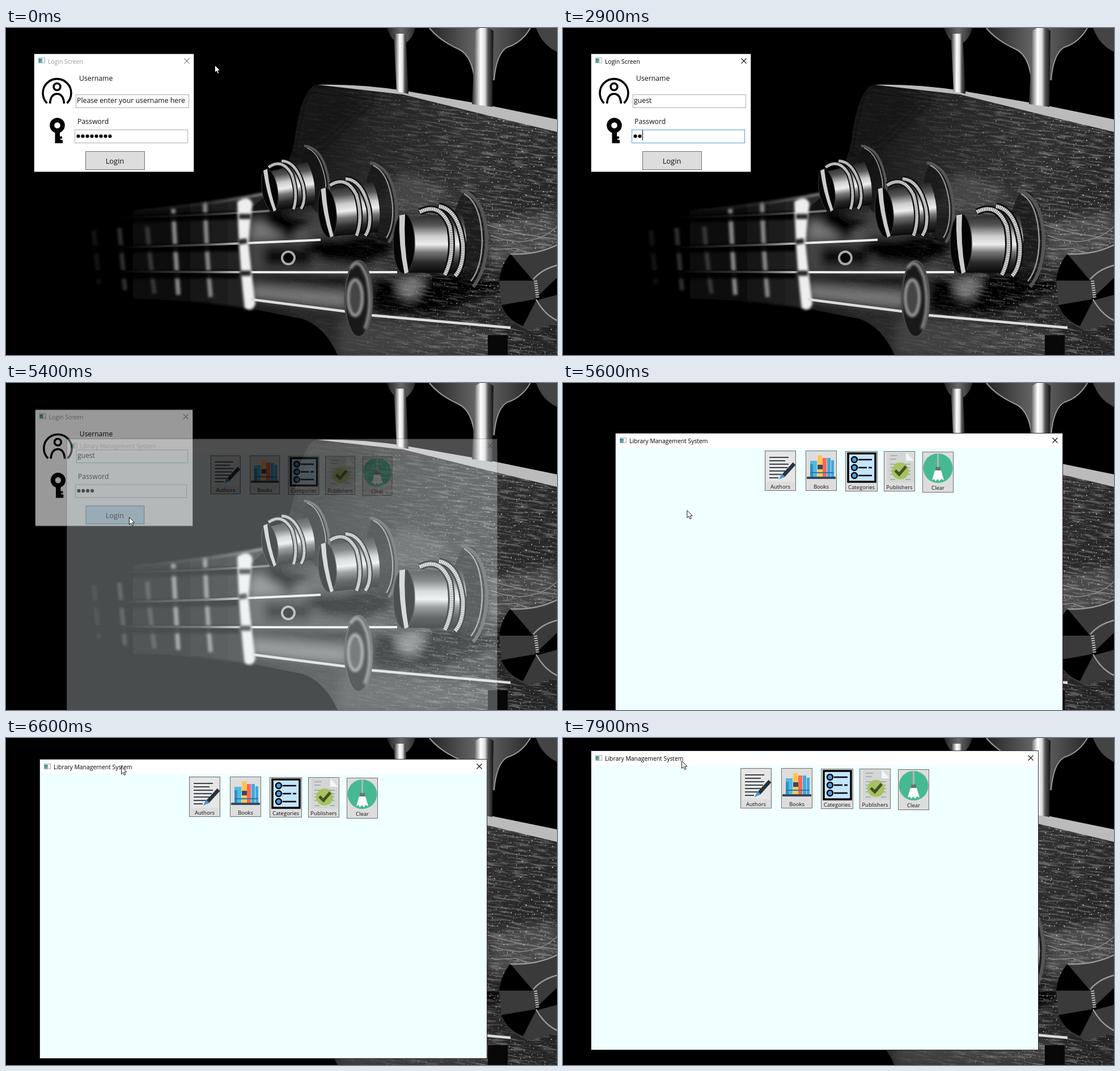
Animation of 972x576 px, one loop 8000 ms. Source, as an HTML page:

```html
<!DOCTYPE html>
<html lang="en">
<head>
<meta charset="utf-8">
<title>Library login</title>
<style>
  html, body { margin: 0; width: 100%; height: 100%; overflow: hidden; background: #000; }
  svg { position: absolute; left: 0; top: 0; }
  #photo { will-change: transform; }
  text { font-family: "Open Sans", "Noto Sans", sans-serif; font-size: 12.3px; fill: #111; white-space: pre; }
  .title { font-size: 10.4px; fill: #000; }
  .idle .title { fill: #999; }
  .idle .close { stroke: #888; }
  .close { stroke: #111; stroke-width: 1.1; }
  .field { fill: #fff; stroke: #abadb3; }
  .field.hover { stroke: #7eb4ea; }
  .field.focus { stroke: #569de5; }
  .button { fill: #ddd; stroke: #707070; }
  .button.hover { fill: #c0e5f8; stroke: #3c7fb1; }
  .small { font-size: 9.5px; text-anchor: middle; }
</style>
</head>
<body>
<svg id="photo" width="972" height="576" viewBox="0 0 972 576">
  <defs>
    <linearGradient id="wood" gradientUnits="userSpaceOnUse" x1="510" y1="180" x2="940" y2="380">
      <stop offset="0" stop-color="#121212"/><stop offset=".3" stop-color="#262626"/>
      <stop offset=".65" stop-color="#303030"/><stop offset="1" stop-color="#242424"/>
    </linearGradient>
    <linearGradient id="neck" x1="0" x2="1">
      <stop offset="0"/><stop offset=".5" stop-color="#0b0b0b"/><stop offset="1" stop-color="#303030"/>
    </linearGradient>
    <linearGradient id="fade" gradientUnits="userSpaceOnUse" x1="200" y1="0" x2="440" y2="0">
      <stop offset="0" stop-color="#000"/><stop offset=".6" stop-color="#444"/><stop offset="1" stop-color="#eee"/>
    </linearGradient>
    <linearGradient id="post" x1="0" x2="1">
      <stop offset="0" stop-color="#222"/><stop offset=".15" stop-color="#777"/><stop offset=".4" stop-color="#fff"/>
      <stop offset=".6" stop-color="#ddd"/><stop offset=".75" stop-color="#555"/><stop offset="1" stop-color="#111"/>
    </linearGradient>
    <linearGradient id="metal" x1="0" y1="0" x2="0" y2="1">
      <stop offset="0" stop-color="#222"/><stop offset=".2" stop-color="#555"/><stop offset=".38" stop-color="#ccc"/>
      <stop offset=".52" stop-color="#eee"/><stop offset=".65" stop-color="#777"/>
      <stop offset=".82" stop-color="#2a2a2a"/><stop offset="1" stop-color="#080808"/>
    </linearGradient>
    <linearGradient id="plate" x1="0" x2="1">
      <stop offset="0" stop-color="#222"/><stop offset=".5" stop-color="#6a6a6a"/><stop offset="1" stop-color="#2a2a2a"/>
    </linearGradient>
    <linearGradient id="rightward" x1="0" x2="1">
      <stop offset=".2" stop-color="#222"/><stop offset=".75" stop-color="#fff"/>
    </linearGradient>
    <filter id="soft" x="-30%" y="-30%" width="160%" height="160%"><feGaussianBlur stdDeviation="8"/></filter>
    <filter id="blur" x="-30%" y="-30%" width="160%" height="160%"><feGaussianBlur stdDeviation="2"/></filter>
    <filter id="grain" x="0" y="0" width="100%" height="100%">
      <feTurbulence type="fractalNoise" baseFrequency=".035 .3" numOctaves="3" seed="7"/>
      <feColorMatrix values="0 0 0 0 .7  0 0 0 0 .7  0 0 0 0 .7  4 0 0 0 -1.900"/>
    </filter>
    <filter id="dust" x="0" y="0" width="100%" height="100%">
      <feTurbulence type="fractalNoise" baseFrequency=".3" numOctaves="2" seed="3"/>
      <feColorMatrix values="0 0 0 0 .8  0 0 0 0 .8  0 0 0 0 .8  9 0 0 0 -6.200"/>
    </filter>
    <mask id="worn"><rect x="500" y="0" width="472" height="576" fill="url(#rightward)"/></mask>
    <path id="head" d="M545 100Q620 98 700 113L850 140L972 180V576H585Q562 525 522 512L440 496L416 332L470 285Q505 235 510 190Q520 115 545 100Z"/>
    <clipPath id="inHead"><use href="#head"/></clipPath>
    <g id="peg">
      <ellipse cx="116" cy="-9" rx="29" ry="84" fill="#111" opacity=".6"/>
      <path d="M102-94Q146-84 148-5Q147 48 124 76" fill="none" stroke="#555" stroke-width="6"/>
      <path d="M108-88Q138-72 140-5Q139 42 120 66" fill="none" stroke="#999" stroke-width="2.500"/>
      <path d="M8-45L104-54Q120 0 104 52L8 51Z" fill="url(#metal)"/>
      <ellipse cx="2" rx="19" ry="53" fill="#050505" stroke="#333" stroke-width="1.500"/>
      <path d="M-6-50L4-52Q1 0 10 50L3 53Q-8 0-6-50Z" fill="#ccc"/>
    </g>
    <path id="wire" d="M30-56Q66-74 83-30Q92 20 74 55M64-66Q98-60 106 0Q108 40 92 57"/>
    <g id="coil" fill="none">
      <use href="#wire" stroke="#0c0c0c" stroke-width="12"/>
      <use href="#wire" stroke="#777" stroke-width="7"/>
      <use href="#wire" stroke="#e4e4e4" stroke-width="6" stroke-dasharray="2 1.200"/>
    </g>
  </defs>
  <rect width="972" height="576"/>
  <path d="M120 330Q290 318 470 287L440 496Q280 470 120 480Z" fill="url(#neck)" filter="url(#blur)"/>
  <g fill="none" stroke="#858585" stroke-width="8" filter="url(#blur)">
    <path d="M295 318Q299 400 304 470M351 308Q354 400 361 474"/>
    <path d="M249 350Q254 410 262 468M200 352L210 462" opacity=".35"/>
    <path d="M155 356L164 450" opacity=".15"/>
  </g>
  <path d="M190 323Q330 318 460 291" stroke="url(#fade)" stroke-width="3" fill="none" opacity=".6" filter="url(#blur)"/>
  <path d="M100 340L410 330M100 391L410 386M100 435L410 434" stroke="#000" stroke-width="14" opacity=".9" filter="url(#blur)"/>
  <use href="#head" fill="url(#wood)"/>
  <g clip-path="url(#inHead)">
    <g filter="url(#soft)">
      <path d="M420 335L560 320L690 440L600 490L435 475Z" fill="#444"/>
      <path d="M430 455L600 468V494L435 478ZM440 340L480 350L540 365L430 372Z" fill="#777"/>
      <path d="M640 330L700 250L790 290L740 325Z" fill="#444"/>
      <path d="M460 325L545 335L500 372L455 345ZM545 370L650 368L690 380L640 420L560 412L520 385Z"/>
      <path d="M425 432L610 437L610 458L430 442ZM640 440L800 430L890 450L760 505L650 500Z"/>
      <path d="M455 385L540 385V420H455Z" fill="#111"/>
      <path d="M690 445L740 440L720 478L695 470Z" fill="#777"/>
      <path d="M850 345L972 320V390L860 420Z" fill="#4a4a4a"/>
      <path d="M590 510L870 535L880 576H585Z" fill="#404040"/>
      <path d="M530 110L650 120L560 205L505 220Z" fill="#121212"/>
    </g>
    <g mask="url(#worn)">
      <g transform="rotate(7 700 300)"><rect x="400" y="20" width="660" height="640" filter="url(#grain)" opacity=".32"/></g>
      <rect x="500" y="90" width="472" height="486" filter="url(#dust)" opacity=".7"/>
    </g>
    <path d="M855 365Q890 380 920 375T972 350M860 390L900 388L935 402M845 345Q880 360 972 372" fill="none" stroke="#888" stroke-width="1.500"/>
  </g>
  <path d="M550 100Q620 98 700 110L850 136L972 161V183L850 154L700 117Z" fill="#bbb"/>
  <path d="M672 0H722Q718 18 704 27H690Q678 18 672 0Z" fill="url(#plate)"/>
  <path d="M684 10H705L710 116L689 112Z" fill="url(#post)"/>
  <path d="M745 0H925Q910 26 884 34Q865 45 861 92L827 96Q824 50 800 38Q760 22 745 0Z" fill="url(#plate)"/>
  <path d="M747 0Q765 22 800 38Q823 50 827 96M925 0Q910 26 884 34Q865 45 861 92" fill="none" stroke="#999" stroke-width="2"/>
  <path d="M828 5Q844-8 860 5L858 139L822 134Z" fill="url(#post)"/>
  <path d="M935 0H972V42Q946 30 935 0Z" fill="#444"/>
  <g fill="none" stroke="url(#fade)" stroke-width="4">
    <path d="M120 388Q340 384 555 373M120 428Q400 431 690 430"/>
    <path d="M190 334Q340 331 465 322" opacity=".4"/>
  </g>
  <path d="M408 306Q428 292 435 309Q430 345 428 380Q434 440 440 486Q434 502 421 493Q411 410 408 306Z" fill="#eee" filter="url(#blur)"/>
  <path d="M410 377L425 375M412 432H432M411 332H432" stroke="#222" stroke-width="9" filter="url(#blur)"/>
  <path d="M432 478L605 500M645 506L890 528" stroke="#ddd" stroke-width="4.500"/>
  <circle cx="498" cy="405" r="11" fill="#050505" stroke="#aaa" stroke-width="4"/>
  <g transform="translate(464 286) rotate(-9) scale(.72)"><use href="#peg"/><use href="#coil" x="-22"/></g>
  <g transform="translate(565 325) rotate(-6) scale(.84)"><use href="#peg"/><use href="#coil" x="-16"/></g>
  <g transform="translate(700 380)"><use href="#peg"/><use href="#coil"/></g>
  <ellipse cx="622" cy="477" rx="24" ry="67" fill="#191919" stroke="#444" stroke-width="3"/>
  <path d="M608 424Q622 398 637 440Q648 490 633 530" fill="none" stroke="#999" stroke-width="5" filter="url(#blur)"/>
  <ellipse cx="616" cy="475" rx="13" ry="32" fill="#444" stroke="#aaa" stroke-width="4" filter="url(#blur)"/>
  <path d="M888 398Q930 398 972 380V520L920 532Q882 518 874 488L870 445Z" fill="#3a3a3a"/>
  <path d="M890 398L930 445L870 445Q874 415 890 398ZM874 488L932 478L972 440V470L935 480L912 525Q884 515 874 488Z"/>
  <path d="M890 398Q935 400 972 382M930 443Q945 425 972 418M935 478Q950 505 972 515" fill="none" stroke="#999" stroke-width="2.500"/>
  <path d="M934 445L938 476" stroke="#bbb" stroke-width="6" stroke-dasharray="2 2"/>
  <rect x="850" y="541" width="35" height="35" fill="#080808"/>
</svg>

<svg id="stage" width="972" height="576" viewBox="0 0 972 576">
  <defs>
    <linearGradient id="teal" x2="1" y2="1"><stop stop-color="#2d7a90"/><stop offset="1" stop-color="#7fc4a5"/></linearGradient>
    <g id="appIcon">
      <rect x="7.5" y="7.5" width="11" height="9" fill="#f5f5f5" stroke="#a5adb5"/>
      <rect x="8" y="9" width="6" height="7" fill="url(#teal)"/>
    </g>
  </defs>

  <g id="login">
    <rect x="-.5" y=".5" width="282" height="208" fill="#fff" stroke="#444"/>
    <use href="#appIcon"/>
    <text class="title" x="24" y="17.5">Login Screen</text>
    <path class="close" d="M264.5 8.5l9 9m0-9l-9 9"/>
    <g fill="none" stroke="#000" stroke-width="3.600">
      <path d="M22.5 87.5A25 25 0 1 1 57.5 87.5"/>
      <circle cx="40" cy="58.5" r="6"/>
      <path d="M27.5 88Q29 71 40 71T52.5 88"/>
    </g>
    <circle cx="40.5" cy="126.5" r="9.3" fill="none" stroke="#000" stroke-width="8"/>
    <path d="M36.5 137H45V146H49V150H46V152H50V158H36.5Z"/>
    <text x="79" y="48">Username</text>
    <rect id="user" class="field" x="73.5" y="72.5" width="199" height="23"/>
    <text id="userText" x="75" y="86.5"></text>
    <text x="76" y="124">Password</text>
    <rect id="pass" class="field" x="71.5" y="134.5" width="199" height="23"/>
    <g id="dots"></g>
    <rect id="caret" width="1" height="18" fill="#000"/>
    <rect id="submit" class="button" x="90.5" y="172.5" width="104" height="32"/>
    <text x="142" y="194" text-anchor="middle" style="font-size:12.9px">Login</text>
  </g>

  <g id="library">
    <rect x="-.5" y="-.5" width="789" height="527" fill="#fff" stroke="#333"/>
    <rect y="25" width="788" height="501" fill="#f0ffff"/>
    <use href="#appIcon"/>
    <text class="title" x="24" y="17">Library Management System</text>
    <path class="close" d="M770.5 7.5l9 9m0-9l-9 9"/>
    <g transform="translate(263 30)">
      <rect class="button" x=".5" y=".5" width="54" height="70"/>
      <rect x="3" y="3" width="49" height="52" fill="#e6e6e6"/>
      <path d="M8 12H42M8 18H36M8 24H42M8 30H40M8 36H36M8 42H30M8 48H24" stroke="#39424c" stroke-width="1.8"/>
      <path d="M52 23L32 45" stroke="#26333f" stroke-width="6.5"/>
      <path d="M30 41L36 46L25 51Z" fill="#4593d2"/>
      <text class="small" x="27.5" y="67">Authors</text>
    </g>
    <g transform="translate(335 30)">
      <rect class="button" x=".5" y=".5" width="54" height="70"/>
      <path d="M8 18H20V46H8Z" fill="#50b9e4"/><path d="M8 24H13V46H8Z" fill="#338fc0"/>
      <path d="M21 9L29 8L31 46H21Z" fill="#ffc553"/><path d="M21 25H30V33H21Z" fill="#34495e"/>
      <path d="M30 13H37V46H30Z" fill="#ff6654"/>
      <path d="M38 13H44V46H38ZM45 17H50V46H45Z" fill="#3fa9db"/>
      <path d="M8 39H50" stroke="#2778a8" stroke-width="2"/>
      <path d="M2 46H53V50H2Z" fill="#34495e"/>
      <text class="small" x="27.5" y="67">Books</text>
    </g>
    <g transform="translate(405 31)">
      <rect class="button" x=".5" y=".5" width="56" height="70"/>
      <rect x="5" y="4" width="48" height="50" fill="#c3e5ff" stroke="#000" stroke-width="3.5"/>
      <g fill="#4b9ae6" stroke="#000" stroke-width="2.4">
        <circle cx="16" cy="15" r="5"/><circle cx="16" cy="29" r="5"/><circle cx="16" cy="43" r="5"/>
        <path d="M23 15H47M23 29H38M41 29H47M23 43H47"/>
      </g>
      <text class="small" x="28.5" y="67">Categories</text>
    </g>
    <g transform="translate(473 31)">
      <rect class="button" x=".5" y=".5" width="54" height="70"/>
      <path d="M6 2H39L53 17V55H6Z" fill="#d2d6d5"/><path d="M39 2V17H53Z" fill="#f3f6f6"/>
      <path d="M11 8H24M11 14H22M11 23H47M11 29H47M11 35H47M11 41H47M11 50H20M38 50H47" stroke="#aab0ae" stroke-width="2"/>
      <circle cx="29" cy="35" r="15" fill="#a7c261"/>
      <path d="M20 34L27 41L39 27" fill="none" stroke="#455027" stroke-width="5"/>
      <text class="small" x="27.5" y="67">Publishers</text>
    </g>
    <g transform="translate(541 32)">
      <rect class="button" x=".5" y=".5" width="54" height="71"/>
      <circle cx="27.5" cy="29" r="26" fill="#46b993"/>
      <path d="M27.5 3V28" stroke="#aeb8b8" stroke-width="3"/>
      <path d="M23 27H32V33H23Z" fill="#66737a"/>
      <path d="M22 33H33L38 50L33 48L30 52L27 48L23 52L21 48L17 50Z" fill="#fff"/>
      <text class="small" x="27.5" y="67">Clear</text>
    </g>
  </g>

  <path id="arrow" d="M.5.5V13.5L3.5 10.8L5.6 15.5L7.8 14.5L5.7 10H9.8Z" fill="#fff" stroke="#000" stroke-width=".9"/>
  <path id="beam" d="M-3-6.5H-.7L0-6L.7-6.5H3M0-6V6M-3 6.5H-.7L0 6L.7 6.5H3" fill="none" stroke="#222"/>
</svg>

<script>
const LOOP = 8000, STEP = 100;
const el = Object.fromEntries([...document.querySelectorAll('#stage [id]')].map(e => [e.id, e]));

// Rows: time, then values
const pointer = [
  [400, 368, 65], [600, 335, 80], [800, 255, 118], [900, 226, 132], [1000, 219, 137.5],
  [1300, 219, 137.5], [1400, 218, 136.5], [3500, 218, 137], [3600, 218, 150], [3700, 217, 190],
  [3800, 217, 225], [3900, 217, 236], [5500, 217, 236], [5700, 220, 212], [6000, 235, 122],
  [6200, 239, 103], [6300, 239, 103], [6400, 235, 98], [6500, 223, 82], [6600, 203, 50],
  [6700, 188, 32], [6800, 187, 35], [7000, 185, 36], [7100, 184, 37], [7200, 184, 37],
  [7300, 187, 36], [7400, 192, 36], [7500, 198, 37], [7600, 197, 37], [7700, 195, 37],
  [7800, 195, 37], [7900, 209, 40]
];
const libraryPath = [
  [6400, 93, 89], [6500, 80, 70], [6600, 60, 38], [6700, 44, 18], [6800, 41, 21], [6900, 41, 21],
  [7000, 39, 22], [7100, 38, 23], [7200, 38, 23], [7300, 41, 22], [7400, 46, 22], [7500, 53, 23],
  [7600, 52, 23], [7700, 50, 23]
];
// Rows: time, opacity, scale
const loginFade = [[5300, 1, 1], [5400, .6, .986], [5500, .1, .955], [5600, 0, .95]];
const libraryFade = [[5300, 0, .93], [5400, .3, .963], [5500, .85, .992], [5600, 1, 1]];
const typed = [[0, 'Please enter your username here'], [1000, ''], [2000, 'g'], [2100, 'gue'], [2200, 'guest']];
const dotCount = [[0, 8], [2400, 0], [2700, 1], [2900, 2], [3000, 3], [3200, 4]];

function held(rows, t) {
  return rows.filter(row => row[0] <= t).pop()[1];
}

function between(rows, t) {
  const next = rows.findIndex(row => row[0] > t);
  if (next < 1) return rows.at(next).slice(1);
  const a = rows[next - 1], b = rows[next], k = (t - a[0]) / (b[0] - a[0]);
  return a.slice(1).map((v, i) => v + (b[i + 1] - v) * k);
}

function place(node, x, y, w, h, [opacity, scale]) {
  node.setAttribute('transform',
    `translate(${x + w / 2 * (1 - scale)} ${y + h / 2 * (1 - scale)}) scale(${scale})`);
  show(node, opacity > 0);
  node.style.opacity = opacity;
}

function show(node, on) { node.style.display = on ? '' : 'none'; }

for (let i = 0; i < 8; i++) {
  el.dots.insertAdjacentHTML('beforeend', `<circle cx="${77.5 + 8 * i}" cy="145.5" r="3.1"/>`);
}

function draw(t) {
  const within = (from, to) => t >= from && t < to;
  const [px, py] = between(pointer, t);
  const over = (x, y, w, h) => px >= x && px < x + w && py >= y && py < y + h;
  const visible = !within(1900, 3500), loginOpen = t < 5400;
  const onUser = visible && loginOpen && over(123, 117, 200, 24);
  const onPass = visible && loginOpen && over(121, 179, 200, 24);
  const userFocus = within(1000, 2400), passFocus = within(2400, 3900);

  place(el.login, 50, 45, 281, 208, between(loginFade, t));
  place(el.library, ...between(libraryPath, t), 788, 526, between(libraryFade, t));
  el.login.classList.toggle('idle', !within(1000, 5400));
  el.library.classList.toggle('idle', t < 5500);

  for (const [node, focus, hover] of [[el.user, userFocus, onUser], [el.pass, passFocus, onPass]]) {
    node.classList.toggle('focus', focus);
    node.classList.toggle('hover', hover);
  }
  el.submit.classList.toggle('hover', within(3800, 5600));

  const name = held(typed, t), dots = held(dotCount, t);
  el.userText.textContent = name;
  [...el.dots.children].forEach((dot, i) => show(dot, i < dots));

  show(el.caret, within(1000, 1600) || within(2000, 2400) || within(2500, 3900));
  const caretX = passFocus ? 74 + 8 * dots : 75 + (name ? el.userText.getComputedTextLength() : 0);
  el.caret.setAttribute('x', Math.round(caretX));
  el.caret.setAttribute('y', passFocus ? 135 : 73);

  const beam = onUser || onPass;
  show(el.beam, beam);
  show(el.arrow, visible && !beam);
  for (const node of [el.arrow, el.beam]) node.setAttribute('transform', `translate(${px} ${py})`);
}

function tick() {
  draw(Math.floor(performance.now() % LOOP / STEP) * STEP);
  requestAnimationFrame(tick);
}
tick();
</script>
</body>
</html>
```
